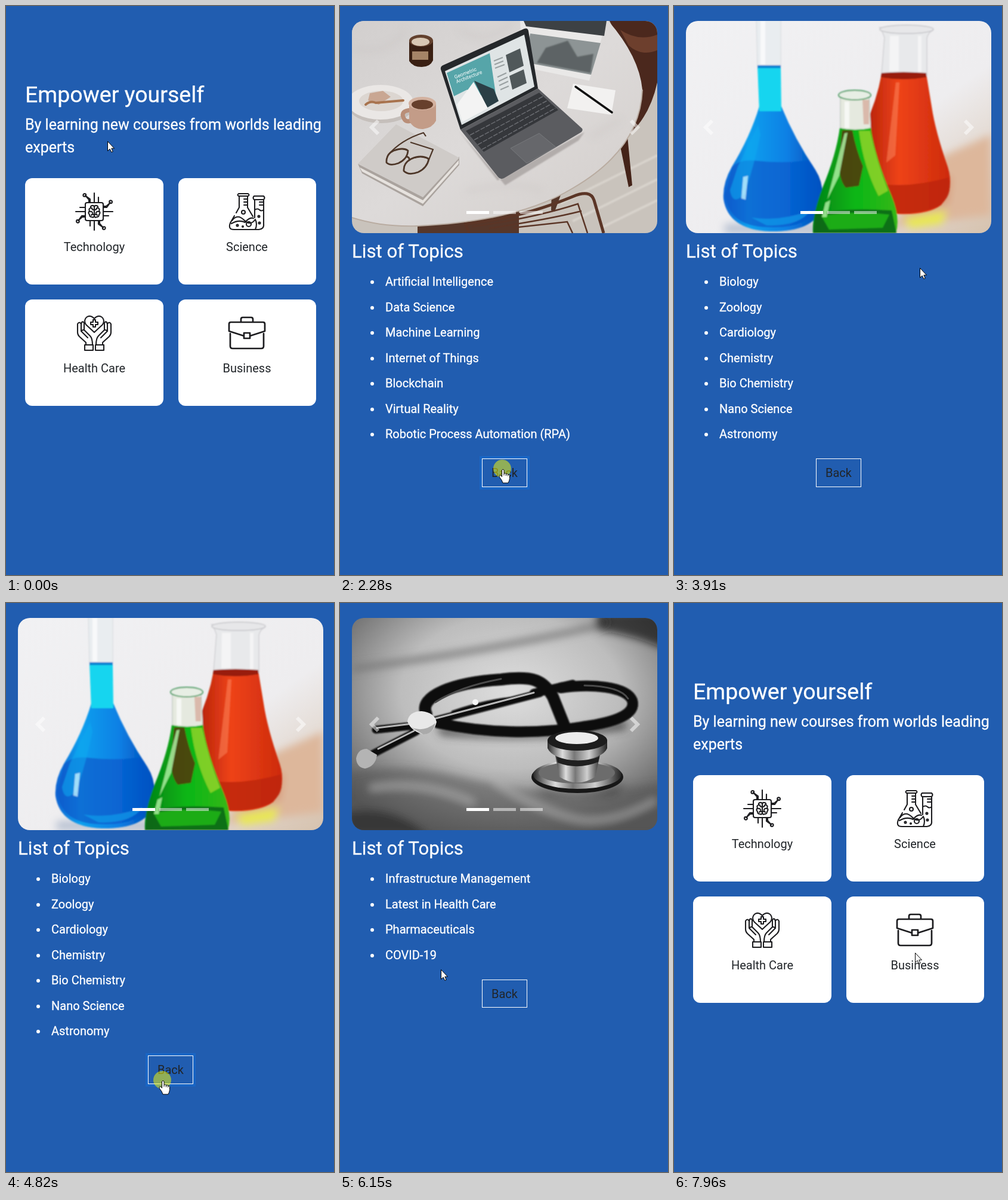
An HTML page for the animation above (8 s loop, 550 px wide and 952 px high).

```html
<!DOCTYPE html>
<html lang="en">
<head>
<meta charset="utf-8">
<title>Course picker</title>
<style>
html, body { margin: 0; width: 100%; height: 100%; overflow: hidden; background: #215db0; }
svg { display: block; width: 100%; height: 100%; }
text { font-family: Roboto, sans-serif; font-size: 20px; fill: #fff; stroke: #fff; stroke-width: .3; white-space: pre; }
.dark, .label { fill: #212529; stroke: none; }
.label { text-anchor: middle; }
.icon { fill: none; stroke: #1c1c1f; stroke-width: 2.1; stroke-linejoin: round; stroke-linecap: round; }
.page, .cur, #spot, .ring { visibility: hidden; }
.on { visibility: visible !important; }
</style>
</head>
<body>
<svg id="stage" viewBox="0 0 550 952" preserveAspectRatio="xMidYMin meet">
<defs>
  <clipPath id="frame"><rect x="20" y="25" width="512" height="355" rx="20"/></clipPath>
  <filter id="soft" x="-20%" y="-50%" width="140%" height="200%"><feGaussianBlur stdDeviation="7"/></filter>
  <filter id="fine"><feGaussianBlur stdDeviation="1"/></filter>
  <linearGradient id="marble" x2="1" y2="1"><stop stop-color="#d2cfce"/><stop offset=".5" stop-color="#dddad9"/><stop offset="1" stop-color="#d3cecb"/></linearGradient>
  <linearGradient id="lab" x2="1" y2="1"><stop stop-color="#f1f1f3"/><stop offset=".6" stop-color="#eeedef"/><stop offset="1" stop-color="#d6c2ae"/></linearGradient>
  <linearGradient id="blue" x2="1"><stop stop-color="#0b62d2"/><stop offset=".25" stop-color="#0ba0ee"/><stop offset=".65" stop-color="#087fe4"/><stop offset="1" stop-color="#0547b4"/></linearGradient>
  <linearGradient id="red" x2="1"><stop stop-color="#b32009"/><stop offset=".4" stop-color="#ee4319"/><stop offset="1" stop-color="#cd2a0c"/></linearGradient>
  <linearGradient id="green" x2="1"><stop stop-color="#058115"/><stop offset=".5" stop-color="#09b613"/><stop offset="1" stop-color="#37b814"/></linearGradient>
  <radialGradient id="cloth" cx=".52" cy=".35" r=".72"><stop stop-color="#dedede"/><stop offset=".5" stop-color="#bdbdbd"/><stop offset="1" stop-color="#565656"/></radialGradient>
  <linearGradient id="steel" x2="1"><stop stop-color="#2b2b2b"/><stop offset=".25" stop-color="#ddd"/><stop offset=".45" stop-color="#777"/><stop offset=".7" stop-color="#cfcfcf"/><stop offset="1" stop-color="#222"/></linearGradient>
  <g id="pin"><path d="M31 16V0M24 16V10L17 5M38 16V7M46 22H51L58 16"/><circle cx="14.8" cy="3.4" r="2.4"/></g>
  <path id="lobe" d="M31 23Q30 20 27 21Q24 22 25 25Q21 26 23 30Q20 33 23 36Q23 40 27 40Q30 42 31 38ZM27 25Q27 28 30 28M24 31Q28 30 28 34M26 37Q27 35 30 36"/>
  <path id="palm" d="M13 50H27V59H13ZM15 50V46L4 36Q1 33 1 29V15Q4 10 7 15V27L18 38M7 27Q11 23 14 27L22 35Q26 39 26 50M7 16L8 12Q11 10 12 14V25"/>
</defs>

<g class="page" id="home">
  <text x="32" y="161" style="font-size:37.5px">Empower yourself</text>
  <text x="32" y="207" style="font-size:25px">By learning new courses from worlds leading</text>
  <text x="32" y="245" style="font-size:25px">experts</text>
  <g fill="#fff">
    <rect x="32" y="288" width="232" height="178" rx="12"/><rect x="289" y="288" width="231" height="178" rx="12"/>
    <rect x="32" y="491" width="232" height="178" rx="12"/><rect x="289" y="491" width="231" height="178" rx="12"/>
  </g>
  <text class="label" x="148" y="410">Technology</text><text class="label" x="404" y="410">Science</text>
  <text class="label" x="148" y="613">Health Care</text><text class="label" x="404" y="613">Business</text>
  <g class="icon" transform="translate(117 313)">
    <rect x="16" y="16" width="30" height="30" rx="3"/>
    <use href="#pin"/><use href="#pin" transform="rotate(90 31 31)"/><use href="#pin" transform="rotate(180 31 31)"/><use href="#pin" transform="rotate(270 31 31)"/>
    <use href="#lobe"/><use href="#lobe" transform="matrix(-1 0 0 1 62 0)"/>
  </g>
  <g class="icon" transform="translate(374 313)">
    <path d="M16 1H32Q35 3 32 5H16Q13 3 16 1ZM17 5V24L12 33M9 38L2 50Q-2 61 8 61H50Q59 60 58 52V11M31 5V24L40 39M42 5H58Q61 8 58 11H42Q39 8 42 5ZM43 11V41M25 10H31M25 15H31M25 20H31M51 15H57M51 20H57M43 28Q48 25 51 28T58 28M5 46Q14 34 25 45T44 44Q48 52 44 61M4 51Q16 44 27 49Q34 40 41 42"/>
    <circle cx="24" cy="32" r="3"/><circle cx="33" cy="52" r="4"/><circle cx="14" cy="54" r="1.5"/><circle cx="23" cy="56" r="1"/><circle cx="50" cy="39" r="1.5"/><circle cx="51" cy="50" r="1.5"/>
  </g>
  <g class="icon" transform="translate(119 517)">
    <path d="M29 29L15 16C8 6 21-4 29 6C37-4 50 6 43 16ZM27 8H31V12H35V16H31V20H27V16H23V12H27Z"/>
    <use href="#palm"/><use href="#palm" transform="matrix(-1 0 0 1 58 0)"/>
  </g>
  <path class="icon" style="stroke-width:2.7" transform="translate(373 519)" d="M21 10V5Q21 2 24 2H38Q41 2 41 5V10M26 33L1 25V13Q1 10 4 10H58Q61 10 61 13V25L36 33M3 29V50Q3 54 7 54H55Q59 54 59 50V29M26 28H36V37H26Z"/>
</g>

<g class="page" id="tech">
  <g clip-path="url(#frame)">
    <path fill="#c9c3bc" d="M20 25H532V380H20Z"/>
    <path fill="none" stroke="#d8d3cc" stroke-width="4" filter="url(#fine)" d="M370 330L532 250M390 360L532 290M440 370L532 325"/>
    <path fill="#56372a" d="M130 368L300 344V380H130ZM355 305L376 300L360 344L354 342Z"/>
    <path fill="#4b281d" d="M452 25H532V128Q515 205 455 235Q500 190 505 130Z"/>
    <path fill="#6d3f2d" d="M470 40Q500 60 532 48V74Q505 85 484 66Z"/>
    <path fill="#442318" d="M468 225L482 218L490 300L484 303Z"/>
    <path fill="url(#marble)" d="M20 25H450Q502 85 507 140Q503 240 390 305Q300 360 130 368Q70 370 20 354Z"/>
    <path fill="none" stroke="#b9aca1" stroke-width="2" d="M507 140Q503 240 390 305Q300 360 130 368Q70 370 20 354"/>
    <path fill="none" stroke="#c3bebc" stroke-width="6" opacity=".4" filter="url(#soft)" d="M20 70Q80 85 110 40M200 40Q250 70 290 25M210 310Q300 290 340 310M420 220L470 190"/>
    <path fill="#e9e8e7" d="M302 25H447L418 125L306 102Z"/>
    <path fill="#3d4144" d="M308 25H447L443 50L312 34Z"/><path fill="#8d9495" d="M319 46L437 62L421 115L309 94Z"/>
    <path fill="#5d6465" filter="url(#fine)" d="M345 70L382 58L398 85L425 80L420 112L330 95Z"/>
    <path fill="#f2f1f0" d="M391 130L462 141L455 182L381 171Z"/><path stroke="#111" stroke-width="3.5" stroke-linecap="round" d="M395 135L456 178"/>
    <path fill="#3a2013" d="M116 57V92Q122 102 137 102Q151 102 156 91V57Z"/>
    <ellipse cx="136" cy="58" rx="20" ry="10" fill="#63412e"/><ellipse cx="135" cy="60" rx="15" ry="7" fill="#d8c7b3"/><path fill="#a58467" d="M121 76H148V90H121Z"/>
    <ellipse cx="69" cy="165" rx="56" ry="31" fill="#c5bfbb"/><ellipse cx="68" cy="161" rx="55" ry="29" fill="#eae7e5"/>
    <ellipse cx="69" cy="159" rx="37" ry="17" fill="#dcd6d1"/><path fill="#c9a793" d="M50 146L72 142L85 152L65 165L47 158Z"/>
    <path fill="none" stroke="#a8734e" stroke-width="4" stroke-linecap="round" d="M43 165Q51 158 60 162L106 158"/>
    <path fill="none" stroke="#b98e78" stroke-width="7" d="M120 174Q100 175 107 188Q111 196 122 191"/>
    <path fill="#c39c88" d="M116 163V192Q123 206 139 206Q155 204 161 192V163Z"/><ellipse cx="138" cy="163" rx="23" ry="11" fill="#d3b19f"/><ellipse cx="138" cy="165" rx="18" ry="8" fill="#67402c"/>
    <path fill="#aaa39e" d="M30 264L37 280L139 335L200 266V252L139 319Z"/><path fill="#cfcbc8" d="M94 198L200 254L139 320L30 264Z"/><path fill="#e6e2de" d="M33 270L139 325L199 258V264L139 331L37 277Z"/>
    <g fill="none" stroke="#4d3628" stroke-width="2.8" stroke-linejoin="round"><path d="M78 262Q77 248 90 242Q106 236 114 242Q113 256 98 263Q84 268 78 262ZM107 276Q106 263 119 256Q136 248 149 256Q146 271 131 278Q115 284 107 276ZM110 252Q117 252 116 258"/><path stroke-width="2.2" d="M80 250Q102 224 140 212L144 218M149 257L156 240L118 228"/></g>
    <path fill="#989290" opacity=".6" filter="url(#fine)" d="M200 210L264 292L410 211L400 225L277 300Z"/>
    <path fill="#25282b" d="M169 106Q168 101 173 99L309 38Q315 36 316 42L332 138L202 207Z"/>
    <path fill="#dfe4e5" d="M176 109L309 48L326 135L204 199Z"/>
    <path fill="#56a5a9" d="M179 112L251 79L263 160L213 140L191 151Z"/><path fill="#2b3f46" d="M225 125L258 139L266 159L247 170Z"/><path fill="#f3f3f3" d="M196 165L224 127L248 171L205 194Z"/>
    <path fill="#50585a" d="M278 82L302 71L308 100L284 111ZM284 117L308 106L313 129L289 140Z"/>
    <path stroke="#9aa1a2" stroke-width="2" d="M258 92L273 86M259 98L274 92M260 104L276 98M264 119L279 112M266 126L281 119M267 133L282 126M269 140L283 134"/>
    <text transform="translate(193 122) rotate(-21)" style="font-size:8.5px;stroke:none">Geometric<tspan x="0" dy="8">Architecture</tspan></text>
    <path fill="#5b5c60" d="M202 207L332 138L406 205Q408 209 403 212L275 288Q269 291 265 286Z"/>
    <path fill="#35373b" d="M211 209L334 145L366 174L241 244Z"/>
    <path stroke="#696b70" stroke-width="1.5" stroke-dasharray="8 2" d="M218 216L341 151M225 224L348 158M231 232L354 164M238 240L361 171"/>
    <path fill="#66676b" stroke="#77797c" d="M286 238L334 213L362 236L313 263Z"/>
    <g fill="none" stroke="#5b3526" stroke-width="5"><path d="M208 365Q300 356 390 319Q420 306 426 325L442 380M211 365L216 380"/><path stroke-width="2.5" d="M222 369Q325 355 399 331L415 380M250 372Q350 357 405 343M290 371L381 361L390 380"/></g>
  </g>
</g>

<g class="page" id="sci">
  <g clip-path="url(#frame)">
    <path fill="url(#lab)" d="M20 25H532V380H20Z"/>
    <g filter="url(#soft)"><path fill="#ddb79b" d="M420 265L532 215V350L370 370Z"/><path fill="#e9e84d" d="M385 355L458 342L450 364L395 372Z"/><path fill="#d79a78" d="M400 300L465 285L460 330L400 345Z"/><path fill="#b5bfd0" d="M85 365H240V380H85Z"/></g>
    <g filter="url(#fine)">
      <path fill="#e9edf0" stroke="#d3d8dc" d="M138 20H179V102H140Z"/><path fill="#f8f9fa" d="M145 25H153V98H145Z"/>
      <path fill="url(#blue)" d="M143 168H180Q202 222 237 274Q255 302 246 340Q234 378 160 377Q91 374 83 323Q81 297 97 269Q128 218 143 168Z"/>
      <path fill="#12d5ef" d="M140 101H179L180 176H143Z"/><path fill="#1185d1" d="M140 99H179V104H140Z"/>
      <path fill="#0756c9" opacity=".65" d="M97 270Q110 255 140 259Q185 264 226 258Q252 290 245 333Q225 374 157 370Q91 369 86 315Z"/>
      <path fill="#17aaf0" opacity=".55" d="M107 269Q123 235 141 199L145 215Q135 265 118 315Q98 335 94 308ZM130 354Q180 361 229 342Q210 369 155 367Z"/>
      <path fill="#c5f2ff" opacity=".8" d="M116 286L124 284L120 324L113 322Z"/>
      <path fill="#e8e9eb" stroke="#d0d0d3" stroke-width="1.5" d="M345 36Q350 43 353 53L348 116H424V54Q426 44 435 40Z"/><ellipse cx="390" cy="39" rx="45" ry="7" fill="#e7e7e9" stroke="#c4c4c8" stroke-width="1.5"/><path fill="#f4f4f5" d="M362 50H377V109H361ZM409 50H415V111H409Z"/>
      <path fill="url(#red)" d="M348 114Q384 119 423 114L432 168Q438 209 459 269Q471 306 448 333Q425 350 375 348L325 330L320 200Q340 159 348 114Z"/>
      <path fill="#981f0d" d="M348 112Q384 109 423 112V119Q384 126 347 119Z"/><path fill="#bd260e" opacity=".8" d="M349 298Q400 304 460 287Q470 319 441 336Q410 349 374 347Z"/><path fill="#ff8c60" opacity=".5" d="M372 128H378L371 250L356 262Z"/>
      <path fill="#e5e9df" stroke="#b3beb3" d="M279 151H327L330 207H279Z"/><path fill="#cf8a78" opacity=".5" d="M316 157H327V198H318Z"/><path fill="#f6f8f4" d="M286 160H294V204H286Z"/>
      <ellipse cx="303" cy="149" rx="27" ry="8" fill="#e7eee4" stroke="#3f9a5c" stroke-width="2"/>
      <path fill="url(#green)" d="M278 204Q303 210 330 204Q337 253 365 318Q380 355 372 380H233Q231 350 249 304Q272 249 278 204Z"/>
      <path fill="#9ed72d" opacity=".75" d="M310 209H329Q340 260 359 309L343 318Q318 270 310 209Z"/><path fill="#543610" opacity=".85" d="M282 208H299Q305 240 317 268L310 301L288 304Q274 288 278 250Z"/>
      <path fill="#0a6415" opacity=".85" d="M237 347Q290 337 365 342L373 380H234Z"/><path fill="#21bc12" opacity=".8" d="M247 351Q305 342 361 349L350 371L260 374Z"/><path fill="#abef9f" opacity=".85" d="M286 213L291 212L277 284L257 324ZM254 329L262 325L256 353L248 353Z"/>
    </g>
  </g>
</g>

<g class="page" id="health">
  <g clip-path="url(#frame)">
    <path fill="url(#cloth)" d="M20 25H532V380H20Z"/>
    <g filter="url(#soft)">
      <path fill="none" stroke="#777" stroke-width="9" d="M20 110Q190 88 330 60T440 30"/><path fill="#111" opacity=".7" d="M430 15H550V80Q500 55 430 45Z"/>
      <path fill="#555" opacity=".5" d="M10 285Q100 265 200 290T400 320L550 300V390H10Z"/><path fill="none" stroke="#b4b4b4" stroke-width="9" opacity=".7" d="M50 310Q140 295 225 335M260 300Q330 345 390 360T530 330"/>
      <path fill="#444" opacity=".8" d="M160 205Q310 235 480 195V212Q330 236 170 222ZM320 305Q405 335 480 300L460 322H350Z"/>
      <path fill="#222" opacity=".6" d="M10 350Q90 335 150 390H10Z"/>
    </g>
    <g fill="none" stroke="#0a0a0a" stroke-linecap="round" filter="url(#fine)">
      <path stroke-width="20" d="M145 186C130 156 190 133 270 128C325 121 342 130 357 157L377 207"/>
      <path stroke-width="18" d="M165 201C245 218 330 220 407 207C465 199 497 185 490 163C480 139 420 135 370 142"/>
      <path stroke-width="15" d="M325 151L390 136"/><path stroke-width="7" d="M190 183Q250 163 295 160"/>
      <path stroke-width="13" d="M60 212L127 205M56 252L128 215"/><path stroke-width="13" d="M153 198L335 151"/>
    </g>
    <g fill="none" stroke="#b8b8b8" stroke-width="3" stroke-linecap="round"><path d="M62 209L120 202M64 244L124 214M157 194L325 150"/><path stroke="#4a4a4a" d="M160 166Q200 140 270 127M410 138Q470 139 483 160"/></g>
    <path fill="#e8e8e8" d="M113 198Q116 181 137 181Q158 183 162 199Q158 217 141 220Q119 215 113 198Z"/><path fill="#aaa" d="M119 208Q140 217 160 201Q156 219 140 220Z"/>
    <path fill="#b4b4b4" d="M27 260Q30 244 45 244L62 254Q60 273 42 277Q28 275 27 260Z"/><circle cx="227" cy="166" r="5" fill="#f5f5f5"/>
    <ellipse cx="398" cy="291" rx="77" ry="27" fill="#171717"/><ellipse cx="398" cy="287" rx="74" ry="24" fill="url(#steel)"/><ellipse cx="397" cy="284" rx="64" ry="18" fill="#6c6c6c"/>
    <path fill="url(#steel)" d="M359 245H438L428 291Q398 310 368 291Z"/><path fill="#202020" d="M363 257Q399 270 435 257L433 266Q398 280 365 267Z"/>
    <path fill="url(#steel)" d="M348 229V243Q356 261 398 263Q441 260 448 243V229Z"/><ellipse cx="398" cy="230" rx="50" ry="17" fill="#1d1d1d"/><ellipse cx="397" cy="226" rx="36" ry="10" fill="#ececec"/>
  </g>
</g>

<circle id="spot" r="15" fill="#ff0" fill-opacity=".5"/>
<g id="mouse">
  <path class="cur" id="arrow" fill="#fff" stroke="#000" d="M.5 .5V16.5L4.2 13.2L6.8 18.6L9.2 17.5L6.8 12.2H11.5Z"/>
  <path class="cur" id="beam" fill="none" stroke="#3a3a3a" d="M-2.5-7.5H-.5L.5-6.5L1.5-7.5H3.5M.5-6.5V6.5M-2.5 7.5H-.5L.5 6.5L1.5 7.5H3.5"/>
  <path class="cur" id="hand" transform="translate(1 .5)" fill="#fff" stroke="#000" stroke-linejoin="round" d="M-1.5 13V2Q0-.5 2 2V8Q4 6 5.5 8.5Q7.5 7 8.7 9.5Q11 8.5 11.5 11V16Q11 20 9 23.5H0Q-1 19-5.5 14Q-7 11-4.5 10.5Q-3 10.5-1.5 13M2 8V11M5.5 8.5V11.5M8.7 9.5V12"/>
</g>
</svg>
<script>
const LOOP = 8000;
const $ = id => document.getElementById(id);
const stage = $("stage");

function add(parent, tag, attrs, text) {
  const el = document.createElementNS("http://www.w3.org/2000/svg", tag);
  for (const key in attrs) el.setAttribute(key, attrs[key]);
  if (text) el.textContent = text;
  parent.append(el);
  return el;
}

const topics = {
  tech: ["Artificial Intelligence", "Data Science", "Machine Learning", "Internet of Things", "Blockchain", "Virtual Reality", "Robotic Process Automation (RPA)"],
  sci: ["Biology", "Zoology", "Cardiology", "Chemistry", "Bio Chemistry", "Nano Science", "Astronomy"],
  health: ["Infrastructure Management", "Latest in Health Care", "Pharmaceuticals", "COVID-19"]
};
const buttonTop = {};

for (const id in topics) {
  const page = $(id), list = topics[id];
  add(page, "path", { d: "M64 192L53 203L64 214M488 192L499 203L488 214", fill: "none", stroke: "#fff", "stroke-width": 6, opacity: .5 });
  [212, 257, 302].forEach((x, i) => add(page, "rect", { x, y: 343, width: 38, height: 5, fill: "#fff", opacity: i ? .5 : 1 }));
  add(page, "text", { x: 20, y: 421, style: "font-size:31.25px" }, "List of Topics");
  list.forEach((name, i) => {
    const y = 468 + 42.5 * i;
    add(page, "circle", { cx: 54, cy: Math.round(y) - 6, r: 3, fill: "#fff" });
    add(page, "text", { x: 76, y: Math.round(y) }, name);
  });
  const edge = 460 + 42.5 * list.length;
  const top = buttonTop[id] = Math.floor(edge), height = Math.floor(edge + 47.5) - top;
  add(page, "rect", { class: "ring", x: 236, y: top - 2, width: 80, height: height + 4, fill: "none", stroke: "#007bff", "stroke-opacity": .25, "stroke-width": 4 });
  add(page, "rect", { x: 238.5, y: top + .5, width: 75, height: height - 1, fill: "none", stroke: "#fff" });
  add(page, "text", { class: "dark", x: 254, y: top + 31 }, "Back");
}

const views = [[0, "home"], [800, "tech"], [2360, "home"], [3660, "sci"], [4890, "home"], [6150, "health"], [7330, "home"]];
const clicks = [[560, 800], [2200, 2360], [3430, 3660], [4660, 4890], [5910, 6150], [7170, 7330]];
const focus = [[2280, 2360], [4740, 4890], [7250, 7330]];

// first step, last step, step count, route of the pointer
const moves = [
  [90, 390, 5, "M170 226Q184 270 170 318"],
  [1110, 1510, 6, "M170 318Q310 500 348 720"],
  [1740, 2050, 5, "M348 720Q232 760 272 774"],
  [2660, 3200, 8, "M272 774Q380 730 411 465L415 424"],
  [3910, 4510, 9, "M415 424Q370 640 262 798"],
  [5140, 5760, 9, "M262 798Q200 735 184 675L169 613"],
  [6550, 7096, 8, "M169 613Q215 692 262 705Q280 708 274 659"],
  [7630, 7960, 5, "M274 658Q350 640 404 585"]
].map(([from, to, steps, d]) => {
  const path = document.createElementNS("http://www.w3.org/2000/svg", "path");
  path.setAttribute("d", d);
  return { from, to, steps, path, length: path.getTotalLength() };
});

const within = (spans, t) => spans.some(([a, b]) => t >= a && t < b);
const ease = u => u * u * (3 - 2 * u);

function pointer(t) {
  const m = moves.filter(m => t >= m.from).pop();
  if (!m) return moves[0].path.getPointAtLength(0);
  const gap = (m.to - m.from) / (m.steps - 1);
  const step = Math.min(m.steps, Math.floor((t - m.from) / gap + .001) + 1);
  return m.path.getPointAtLength(m.length * ease(step / m.steps));
}

function shape(view, p) {
  const top = buttonTop[view];
  if (top && p.x > 238 && p.x < 314 && p.y > top && p.y < top + 48) return "hand";
  const overText = [...$(view).querySelectorAll(":scope > text")].some(el => {
    const b = el.getBBox();
    return p.x > b.x && p.x < b.x + b.width && p.y > b.y && p.y < b.y + b.height;
  });
  return overText ? "beam" : "arrow";
}

const show = (selector, test) =>
  stage.querySelectorAll(selector).forEach(el => el.classList.toggle("on", test(el)));

function draw(t) {
  const view = views.filter(v => t >= v[0]).pop()[1];
  const p = pointer(t), x = Math.round(p.x), y = Math.round(p.y);
  const kind = shape(view, p), focused = within(focus, t);
  show(".page", el => el.id === view);
  show(".ring", el => focused && el.parentNode.id === view);
  show(".cur", el => el.id === kind);
  show("#spot", () => within(clicks, t));
  $("mouse").setAttribute("transform", `translate(${x} ${y})`);
  $("spot").setAttribute("transform", `translate(${x} ${y})`);
}

const start = performance.now();
function tick() {
  draw((performance.now() - start) % LOOP);
  requestAnimationFrame(tick);
}
tick();
</script>
</body>
</html>
```
